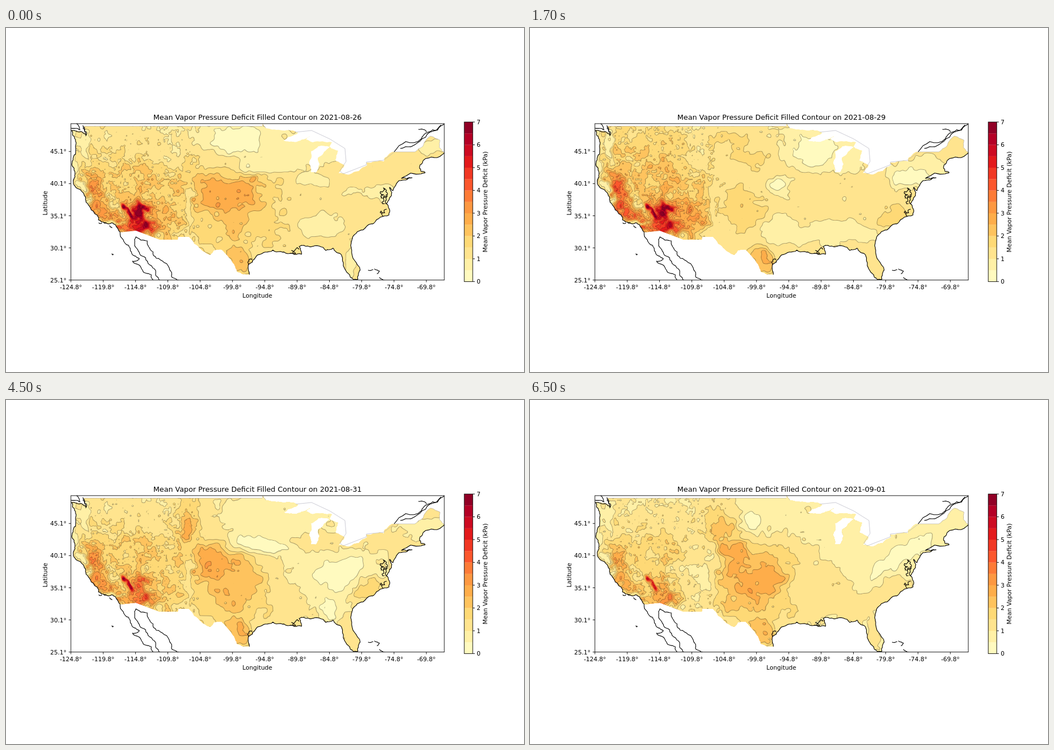
An HTML page with a canvas that plays this animation: 917x611 px, repeating every 8000 ms.

```html
<!DOCTYPE html>
<html>
<head>
<meta charset="utf-8">
<title>Mean Vapor Pressure Deficit</title>
<style>
  html, body { margin: 0; width: 100%; height: 100%; overflow: hidden; background: #fff; }
  canvas, svg { position: absolute; left: 0; top: 0; }
  text { font: 10.61px "DejaVu Sans", sans-serif; text-anchor: middle; }
  #title { font-size: 12.74px; }
  .line { fill: none; stroke: #000; stroke-width: 1.1; stroke-linejoin: round; }
  .border { fill: none; stroke: #99a; stroke-width: .5; }
  .axis { fill: none; stroke: #000; stroke-width: .9; }
</style>
</head>
<body>
<canvas id="map" width="917" height="611"></canvas>
<svg id="chart" width="917" height="611" viewBox="0 0 917 611">
  <clipPath id="box"><rect x="115" y="170" width="661" height="278"/></clipPath>
  <g id="coast" clip-path="url(#box)"></g>
  <g id="bar"></g>
  <rect class="axis" x="114.9" y="169.9" width="661" height="277.8"/>
  <rect class="axis" x="811.2" y="167" width="15" height="283.4"/>
  <g id="ticks"></g>
  <text id="title" x="445.3" y="162.6"></text>
  <text x="445" y="479">Longitude</text>
  <text transform="translate(72.5 311) rotate(-90)">Latitude</text>
  <text transform="translate(851.8 308.7) rotate(-90)">Mean Vapor Pressure Deficit (kPa)</text>
</svg>
<script>
const X0 = 115, Y0 = 170, W = 661, H = 278;
const $ = id => document.getElementById(id);
const clamp = (v, lo = 0, hi = 1) => Math.min(hi, Math.max(lo, v));

// ---- Noise ----
const hash = (x, y) => {
  let h = Math.imul(x, 374761393) + Math.imul(y, 668265263);
  h = Math.imul(h ^ h >>> 13, 1274126177);
  return ((h ^ h >>> 16) >>> 0) / 2 ** 31 - 1;
};
const noise = (x, y) => {
  const i = Math.floor(x), j = Math.floor(y);
  let u = x - i, v = y - j;
  u *= u * (3 - 2 * u);
  v *= v * (3 - 2 * v);
  const a = hash(i, j), b = hash(i, j + 1);
  const top = a + (hash(i + 1, j) - a) * u;
  return top + (b + (hash(i + 1, j + 1) - b) * u - top) * v;
};

// ---- Colours ----
const ramp = ['ffffcc', 'ffeda0', 'fed976', 'feb24c', 'fd8d3c', 'fc4e2a', 'e31a1c', 'bd0026', '800026']
  .map(c => [0, 2, 4].map(i => parseInt(c.slice(i, i + 2), 16)));
const bands = Array.from({ length: 14 }, (_, i) => {
  const p = (i + .5) / 14 * 8, k = Math.floor(p);
  return ramp[k].map((c, n) => Math.round(c + (ramp[k + 1][n] - c) * (p - k)));
});

// ---- Outlines: a few points, roughened by midpoint displacement ----
const points = s => s.trim().split(/\s+/).map(p => p.split(',').map(Number));
const rough = (s, amount = .15, rounds = 3) => {
  let pts = points(s);
  for (; rounds; rounds--) pts = pts.flatMap((p, i) => {
    if (!i) return [p];
    const [x, y] = pts[i - 1], dx = p[0] - x, dy = p[1] - y;
    const k = amount * hash(Math.round(x * 9 + p[0]), Math.round(y * 9 + p[1]) + rounds);
    return [[x + dx / 2 - dy * k, y + dy / 2 + dx * k], p];
  });
  return pts;
};
const path = pts => 'M' + pts.map(p => p.map(v => v.toFixed(1)).join()).join('L');

const pacific = rough(`116,181 123,198 124,206 123,224 117,245 122,256 119,272 126,285
  141,303 142,310 155,326 162,333 164,341 187,346 194,350 202,363`);
const desert = points('230,360 272,376 304,376 305,371');
const river = rough('324,371 345,393 361,403 368,395 382,394 404,420 409,433 431,438', .1);
const gulf = rough(`431,438 429,421 440,410 459,398 486,397 510,402 523,402 519,388
  536,388 553,387 566,395 579,391 592,401 597,422 606,436 615,447`);
const atlantic = rough(`615,447 623,446 627,430 612,394 611,383 615,369 637,354 651,347 678,332 673,312
  683,292 679,283 685,289 696,271 719,266 700,267 735,259 742,257 735,255 733,243 739,235 776,222`);
const maine = rough('776,222 767,212 768,199 751,192 742,201 738,210 724,220', .08);
const lakes = rough(`684,220 670,231 669,237 638,239 639,244 608,260 589,258 599,244 583,235 588,218
  573,211 577,203 543,203 531,198 538,192 524,198 509,202 491,200 499,194 517,186 490,182 460,178 454,170`, .1);
const sound = points('454,174.3 138,174.3 143,188 134,184');
const michigan = rough('540,256 548,257 555,241 552,231 563,220 573,211 553,210 540,219 541,228 537,241 540,256', .1);
const land = path([...pacific, ...desert, ...river, ...gulf, ...atlantic, ...maine, ...lakes, ...sound])
  + 'Z' + path(michigan) + 'Z';

const border = '513,185 541,182 573,197 600,214 602,237 591,254 597,259 638,243 638,238 668,235 688,220 724,220';
const baja = `202,363 217,386 226,404 236,410 224,414 240,428 257,438 260,448/
  272,448 265,431 247,408 231,391 230,371 250,378 252,388 266,409 290,430 293,441 306,448`;
const north = `115,178 131,181 124,169/136,173 142,190 134,184 116,182/
  687,220 735,197 747,185 777,169/698,214 733,201 770,172/730,180 745,184`;
const islands = `187,401 190,402 188,403/164,346 170,347/173,346 178,346/183,351 188,355/
  641,430 650,429/652,428 661,432 657,437/661,443 671,448`;
const bays = `672,312 664,302 669,296 668,284 674,292 674,300 670,312/667,334 664,325 674,322/
  505,395 519,393/137,176 141,192/429,421 436,411`;

const add = (pts, cls = 'line') => $('coast').insertAdjacentHTML('beforeend', `<path class="${cls}" d="${path(pts)}"/>`);
[maine, lakes.slice(-9), sound.slice(0, 2), points(border)].forEach(p => add(p, 'border'));
[pacific, gulf, atlantic].forEach(p => add(p));
[baja, north, islands].join('/').split('/').forEach(s => add(rough(s, .17)));
bays.split('/').forEach(s => add(rough(s, .55)));

// ---- Axes ----
const tick = (x1, y1, dx, dy, label, x, y, anchor = 'middle') => $('ticks').insertAdjacentHTML('beforeend',
  `<path class="axis" d="M${x1},${y1}l${dx},${dy}"/><text x="${x}" y="${y}" style="text-anchor:${anchor}">${label}</text>`);
for (let i = 0; i < 12; i++) {
  const x = 114.9 + i * 57.2;
  tick(x, 447.7, 0, 3.8, (-124.8 + 5 * i).toFixed(1) + '°', x, 463.6);
}
for (let i = 0; i < 5; i++) {
  const y = 447.7 - i * 57.1;
  tick(114.9, y, -3.8, 0, (25.1 + 5 * i).toFixed(1) + '°', 107.2, y + 4, 'end');
}
for (let i = 0; i < 8; i++) {
  const y = 450.4 - i * 40.49;
  tick(826.2, y, 3.8, 0, i, 833.2, y + 4, 'start');
}
$('bar').innerHTML = bands.map((c, i) =>
  `<rect x="811.2" y="${450.4 - (i + 1) * 20.243}" width="15" height="20.4" fill="rgb(${c})"/>`).join('');

// ---- Fields: ellipses painted in order ----
// Lasting regions as x, y, rx, ry, angle; each day gives their values.
const regions = [
  [195,212,95,45], [200,270,92,28], [285,330,40,36], [222,332,52,32], [157,302,13,48,-28], [233,347,34,18],
  [231,322,13,15], [249,321,18,3,8], [206,320,5,16,-32], [403,412,18,26], [613,416,13,28], [634,336,30,16,-15]];
// Cool coast and ranges: x, y, rx, ry, kPa, angle
const relief = [[120,215,7,46,.75], [146,205,5,38,.8], [126,284,6,17,.9,-30],
  [143,309,5,13,1,-30], [182,345,20,4,1.4], [181,300,6,34,1.5,-30], [325,320,6,40,1.2]];

const day = (from, date, base, values, ...spots) => ({ from, date, base,
  spots: [...spots, ...regions.map(([x, y, rx, ry, a], i) => [x, y, rx, ry, values[i], a]), ...relief] });

const thursday = day(0, '2021-08-26', 1.25, [1.3, 2.05, 1.8, 3, 3.2, 4.8, 6.1, 5.2, 6.9, 2.25, .8, 1.2],
  [385,320,115,85,1.7], [395,295,62,34,2.25], [405,350,18,35,2.2], [391,294,46,25,2.75], [435,270,9,8,2.7],
  [408,196,66,27,.35], [462,243,45,16,.5], [530,212,65,40,.8], [543,270,32,11,.75], [650,290,55,14,.9],
  [555,350,42,22,.8], [755,208,24,18,.8]);
const sunday = day(500, '2021-08-29', 1.2, [1.75, 2.25, 2.4, 3.4, 4.1, 4.4, 5.5, 5.5, 6.9, 2.4, 1.25, 1.7],
  [350,195,40,16,1.7], [395,232,38,17,1.75], [378,325,32,42,1.75], [560,225,45,28,.8], [505,212,52,38,.4],
  [433,282,22,18,.4], [445,360,45,28,.85], [540,362,65,22,.8], [700,252,62,25,.8], [672,262,32,20,.4]);
const monday = day(2500, '2021-08-30', 1.25, [1.65, 2.2, 2.2, 3.2, 4.1, 4.1, 4.7, 4.6, 6.9, 2.3, 1.25, 1.65],
  [385,270,80,75,1.7], [318,205,32,40,2.25], [366,273,30,26,2.25], [410,330,40,42,1.75], [428,250,28,18,.8],
  [570,270,65,22,.85], [550,325,75,45,.8], [520,350,42,28,.35], [680,240,75,30,.8], [550,205,45,27,.75],
  [690,236,32,12,.4]);
const tuesday = day(4500, '2021-08-31', 1.2, [1.25, 2, 1.65, 2.4, 3.3, 3.3, 3.3, 3.3, 6.5, 2.4, 1.3, 1.65],
  [385,325,85,75,1.75], [318,212,32,48,2.25], [324,221,15,18,2.75], [375,285,38,32,2.3], [405,338,42,45,2.25],
  [369,291,31,20,2.75], [480,205,120,38,.82], [455,258,66,20,.4,14], [560,260,40,12,1.2], [585,310,80,40,.8],
  [590,303,58,26,.35,-25], [575,372,20,28,.4], [735,230,55,22,.85]);
const wednesday = day(6500, '2021-09-01', .85, [1.15, 1.8, .8, 2.1, 2.75, 2.7, 2.2, 1.2, 5.5, 2.3, 1.2, 1.25],
  [315,205,45,40,1.7], [395,325,105,78,1.75], [390,325,67,58,2.25], [345,235,18,26,2.2], [361,272,24,18,2.75],
  [408,327,38,24,2.75,8], [368,297,25,15,2.6], [388,210,18,24,.4], [575,355,105,30,1.25], [510,330,55,25,1.3],
  [655,275,90,18,.4,-34], [285,288,44,30,.55]);
const days = [thursday, sunday, monday, tuesday, wednesday];

// Static terrain: warped x and y, and relative roughness
const terrain = new Float32Array(W * H * 3);
for (let y = 0, i = 0; y < H; y++) for (let x = 0; x < W; x++) {
  const west = clamp((235 - x) / 45);
  const fine = noise(x / 7, y / 7), broad = noise(x / 34 + 50, y / 26);
  terrain[i++] = x + X0 + 11 * noise(x / 28, y / 24) + 5 * noise(x / 9 + 80, y / 9);
  terrain[i++] = y + Y0 + 8 * noise(x / 28 + 30, y / 24) + 4 * noise(x / 9, y / 9 + 40);
  terrain[i++] = 1 + (1 - west) * (.1 * broad + .1 * noise(x / 13, y / 12) + .08 * fine)
    + west * (.17 * broad + .22 * noise(x / 12 + 9, y / 15) + .16 * fine + .1 * noise(x / 3.5, y / 3.5));
}

const render = ({ base, spots }) => {
  const ellipses = spots.map(([x, y, rx, ry, v, angle = 0]) => {
    const a = angle * Math.PI / 180, c = Math.cos(a), s = Math.sin(a);
    return [x, y, c / rx, s / rx, c / ry, s / ry, v];
  });
  const f = new Float32Array(W * H);
  for (let i = 0; i < f.length; i++) {
    const x = terrain[3 * i], y = terrain[3 * i + 1];
    let v = base;
    for (const [cx, cy, ax, bx, ay, by, value] of ellipses) {
      const dx = x - cx, dy = y - cy;
      const p = dx * ax + dy * bx, q = dy * ay - dx * by, d = p * p + q * q;
      if (d < 6) v += (value - v) / (1 + d * d * d);
    }
    f[i] = clamp(v * terrain[3 * i + 2], .05, 6.95) * 2;
  }
  const layer = document.createElement('canvas');
  layer.width = W;
  layer.height = H;
  const ctx = layer.getContext('2d'), img = ctx.createImageData(W, H);
  for (let i = 0; i < f.length; i++) {
    const v = f[i], g = Math.hypot(f[i + 1] - v, f[i + W] - v) || 1e-6;
    const near = Math.abs(v - Math.max(1, Math.round(v)));
    const shade = 1 - .33 * clamp(1 - near / g) * clamp(1.25 - g, .2, 1);
    bands[Math.floor(v)].forEach((c, k) => img.data[4 * i + k] = c * shade);
    img.data[4 * i + 3] = 255;
  }
  ctx.putImageData(img, 0, 0);
  return layer;
};
const layers = days.map(render);

const view = $('map').getContext('2d');
view.clip(new Path2D(land), 'evenodd');
let shown = -1;
const play = () => {
  const t = performance.now() % 8000;
  const n = days.findLastIndex(d => t >= d.from);
  if (n !== shown) {
    shown = n;
    view.drawImage(layers[n], X0, Y0);
    $('title').textContent = 'Mean Vapor Pressure Deficit Filled Contour on ' + days[n].date;
  }
  requestAnimationFrame(play);
};
play();
</script>
</body>
</html>
```
